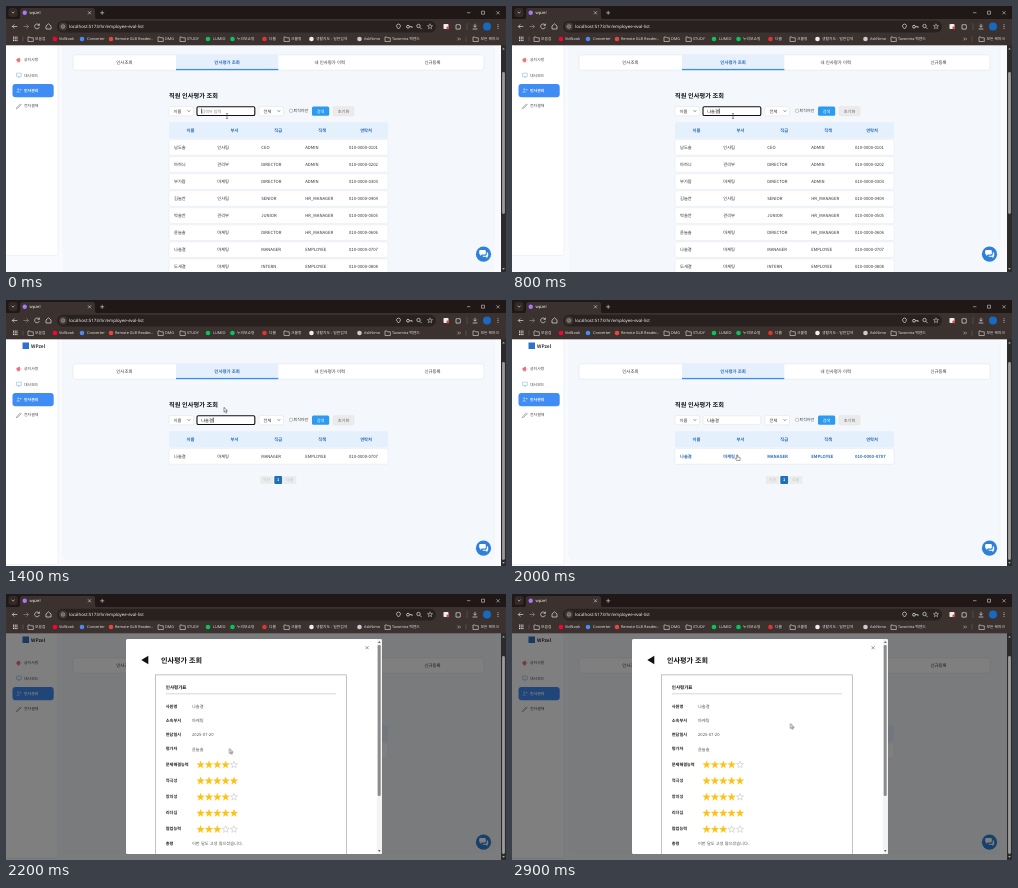
An HTML page for the animation above (3 s loop, 500x266 px).

```html
<!DOCTYPE html>
<html lang="ko">
<head>
<meta charset="utf-8">
<title>Employee evaluation</title>
<style>
html, body { margin: 0; width: 100%; height: 100%; overflow: hidden; background: #f6f8fc; }
svg { display: block; width: 100%; height: 100%; }
text { font-family: "Noto Sans CJK KR", "Noto Sans CJK", "Noto Sans", sans-serif; text-rendering: geometricPrecision; white-space: pre; }
.ui text { font-family: "Noto Sans", "Noto Sans CJK KR", "Noto Sans CJK", sans-serif; }
</style>
</head>
<body>
<script>
const LOOP = 3000;
let css = '', animCount = 0;

// Stepped animation: each stop is [ms, value] and holds until the next one.
function anim(prop, stops) {
  const name = 'a' + animCount++;
  const frames = stops.map(([t, v]) => `${Math.max(0, t - 4) / LOOP * 100}%{${prop}:${v}}`);
  css += `@keyframes ${name}{${frames.join('')}}`;
  return `style="animation:${name} ${LOOP}ms step-end infinite"`;
}
const move = stops => anim('transform', stops.map(([t, x, y]) => [t, `matrix(1,0,0,1,${x},${y})`]));
const during = (from, to, body) =>
  `<g ${anim('opacity', [...(from ? [[0, 0]] : []), [from, 1], ...(to < LOOP ? [[to, 0]] : [])])}>${body}</g>`;

const text = (x, y, size, str, fill = '#333', weight = 400, anchor = 'start') =>
  `<text x="${x}" y="${y + size * .36}" font-size="${size}" fill="${fill}" font-weight="${weight}" text-anchor="${anchor}">${str}</text>`;
const mid = (x, y, size, str, fill, weight) => text(x, y, size, str, fill, weight, 'middle');
const rect = (x, y, w, h, fill, r = 0, more = '') =>
  `<rect x="${x}" y="${y}" width="${w}" height="${h}" rx="${r}" fill="${fill}" ${more}/>`;
const dot = (x, y, r, fill) => `<circle cx="${x}" cy="${y}" r="${r}" fill="${fill}"/>`;
const line = (d, color = '#ddd', w = .7, fill = 'none') =>
  `<path d="${d}" stroke="${color}" stroke-width="${w}" fill="${fill}" stroke-linejoin="round"/>`;
const shape = (d, fill) => `<path d="${d}" fill="${fill}"/>`;
const border = (color, w = .5) => `stroke="${color}" stroke-width="${w}"`;

/* ---------- browser frame ---------- */
const folder = x => line(`M${x} 31h2l.7.8h2.6v3.7h-5.3z`, '#ddd', .6);
const bookmarks = [
  ['f', 22, 29, '모음집'], ['#f03', 49, 53, 'VidNook'], ['#4a8af4', 76, 81, 'Converter'],
  ['#e8463c', 105, 109, 'Remote GLB Reader...'], ['f', 152, 159, 'DMG'], ['f', 174, 181, 'STUDY'],
  ['#03c75a', 202, 207, 'LUMIO'], ['#03c75a', 226.5, 231, '누리보쇼핑'], ['#e5322d', 258.5, 263, '다룸'],
  ['f', 278, 285, '크롤링'], ['#eee', 305.5, 310, '생활지도 - 일반검색'], ['#ccc', 353.5, 358, 'AskNimo'],
  ['f', 379, 386, 'Tavomira 백엔드'], ['f', 467, 474.5, '모든 북마크']
].map(([kind, x, tx, label]) => (kind === 'f' ? folder(x) : dot(x, 33, 2.3, kind)) + text(tx, 33, 3.8, label, '#ddd')).join('');

const chrome = `<g class="ui">
  ${rect(0, 0, 500, 14, '#1f1816')}${rect(0, 13, 500, 26.3, '#3b322f')}
  ${rect(2.5, 2, 9, 9, '#332a27', 2.5)}${line('M5.7 5.8l1.4 1.4 1.4-1.4')}
  ${shape('M11 13.5q3 0 3-3V4.5q0-2.5 2.5-2.5h70q2.5 0 2.5 2.5v6q0 3 3 3z', '#3b322f')}
  ${dot(18.7, 6.8, 2.2, '#a779f6')}${text(23.5, 6.7, 4.1, 'wpzel', '#eee')}
  ${line('M82 5.3l3 3m0-3l-3 3M94.2 6.8h4m-2-2v4', '#ddd', .6)}
  ${line('M461 6.7h3.4M475.5 5.2h3v3h-3zM490.4 5.2l3.2 3.2m0-3.2l-3.2 3.2', '#eee', .5)}
  ${line('M11.3 20.5h-5m2-2l-2 2 2 2', '#ddd')}
  ${line('M17.5 20.5h5m-2-2l2 2-2 2', '#918884')}
  ${line('M33 19a2.4 2.4 0 1 0 .3 2.2M33.4 17.6v1.8h-1.8', '#ddd')}
  ${line('M40 23v-3l2.5-2.2L45 20v3z', '#ddd')}
  ${rect(51, 14.8, 379, 11.6, '#29211f', 5.8)}${dot(57, 20.5, 4, '#443b38')}
  <circle cx="57" cy="20.5" r="1.7" fill="none" ${border('#ddd')}/>${line('M57 19.8v1.6', '#ddd', .5)}
  ${text(63, 20.4, 4.4, 'localhost:5173/hr/employee-eval-list', '#eee')}
  ${line('M392.5 23q-4-4 0-5 4 1 0 5z', '#ddd')}
  <circle cx="402" cy="20.7" r="1.4" fill="none" ${border('#ddd', .8)}/>${line('M403.4 20.7h2.7v1.2', '#ddd', .8)}
  <circle cx="412.5" cy="20" r="1.7" fill="none" ${border('#ddd', .7)}/>${line('M413.8 21.3l1.8 1.8', '#ddd')}
  ${line(star(424, 20.5, 2.7), '#ddd', .5)}
  ${rect(437.5, 18, 5, 5, '#eee', .8)}${dot(441.8, 22, 1.4, '#e04437')}
  ${line('M450 18.8h1.5q.7-1.5 1.4 0h1.3v1.5q1.5.7 0 1.4v1.4H450z', '#ddd')}
  ${line('M461 17v7', '#6d625e', .5)}
  ${line('M469 17.8v3.4m-1.6-1.5l1.6 1.6 1.6-1.6M466.6 23h4.8', '#ddd')}
  ${dot(481, 20.5, 4, '#1769c2')}${[18.7, 20.5, 22.3].map(y => dot(492, y, .5, '#ddd')).join('')}
  ${[0, 1, 2].map(i => [0, 1, 2].map(j => rect(7 + i * 1.7, 30.6 + j * 1.7, 1.1, 1.1, '#ddd')).join('')).join('')}
  ${line('M17 30.5v5M460 30.5v5', '#746a66', .5)}${bookmarks}
  ${line('M451.5 31.7l1.3 1.3-1.3 1.3m1.8-2.6l1.3 1.3-1.3 1.3', '#ddd', .5)}
</g>`;

const scrollbar = rect(495, 39, 5, 227, '#2b2b2b') +
  shape('M496.2 43.6l1.3-1.8 1.3 1.8z', '#aaa') + shape('M496.2 262l1.3 1.8 1.3-1.8z', '#aaa') +
  during(0, 1400, rect(496.1, 66, 2.8, 142, '#9c9c9c', 1.4)) +
  during(1400, LOOP, rect(496.1, 62, 2.8, 198, '#9c9c9c', 1.4));

/* ---------- page ---------- */
const blue = '#2b6cb5';
const EMPLOYEE = '나솔결';
const columns = [168, 211.3, 255.2, 299.2, 343];
const staff = [
  ['남도솔', '인사팀', 'CEO', 'ADMIN', '0101'], ['마하늬', '관리부', 'DIRECTOR', 'ADMIN', '0202'],
  ['부가람', '마케팅', 'DIRECTOR', 'ADMIN', '0303'], ['김늘찬', '인사팀', 'SENIOR', 'HR_MANAGER', '0404'],
  ['박솔찬', '관리부', 'JUNIOR', 'HR_MANAGER', '0505'], ['윤늘솔', '마케팅', 'DIRECTOR', 'HR_MANAGER', '0606'],
  [EMPLOYEE, '마케팅', 'MANAGER', 'EMPLOYEE', '0707'], ['도새결', '마케팅', 'INTERN', 'EMPLOYEE', '0808']
];
function row(person, i, fill = '#333', weight = 400) {
  const y = 156.4 + i * 17.05;
  return rect(163, y - 7.8, 219, 15.6, '#fff', 1.5, border('#e6ebf2', .6)) +
    person.map((v, c) => text(columns[c], y, 4.25, c === 4 ? '010-0000-' + v : v, fill, weight)).join('');
}
const select = (x, label) => rect(x, 115.5, 24.5, 9.3, '#fff', 1.5, border('#dde1e6')) +
  text(x + 4.6, 120, 4.2, label) + line(`M${x + 18.7} 119.4l1.2 1.2 1.2-1.2`, '#222', .6);

const menu = [['공지사항', 69], ['대시보드', 84.2], ['인사관리', 99.5], ['전자결재', 114.8]]
  .map(([label, y], i) => text(18, y, 3.9, label, i === 2 ? '#fff' : '#444', i === 2 ? 700 : 500)).join('');
const menuIcons = shape('M10.5 68l3.4-1.6v5.2l-3.4-1.6z', '#e9707a') + line('M11.6 70.2l.5 1.7M14.8 68.2v1.6', '#e9707a', .6) +
  line('M10.5 82.2h4.8v3.2h-4.8zM12 86.4h2', '#8fbbe4', .6) +
  dot(12.2, 98.4, 1.1, '#8ec6ff') + shape('M10 101.6q2.2-3.4 4.4 0z', '#8ec6ff') + dot(14.7, 98.8, .8, '#b9dcff') +
  line('M10.8 116.6l3.6-3.7.8.8-3.6 3.6-1.2.3z', '#777', .6);

const sidebar = rect(-4, 30, 56, 234.5, '#fff', 2, border('#e7ebf1', .6)) +
  rect(16.5, 42.5, 6.5, 6.5, '#2f73c9') + text(25, 46.2, 4.8, 'WPzel', '#333', 700) +
  rect(6.5, 93, 41.2, 13.2, '#3f8cf4', 3) + menu + menuIcons;

const tabs = rect(67, 63.8, 411, 15.4, '#fff', 2.5, border('#e4e9f0', .7)) +
  rect(170, 63.8, 102.3, 15.4, '#e5f0fc') + rect(170, 77.9, 102.3, 1.3, '#3d8fe6') +
  ['인사조회', '인사평가 조회', '내 인사평가 이력', '신규등록']
    .map((s, i) => mid(118.4 + i * 102.7, 71.3, 4.4, s, i === 1 ? blue : '#333', i === 1 ? 700 : 500)).join('');

// Composition stages of the typed name, one per keystroke.
const stages = ['', 'ㄴ', '나', '낫', '나소', '나솔', '나솔ㄱ', EMPLOYEE];
const typed = stages.map((s, i) => {
  const to = i === stages.length - 1 ? LOOP : (i + 1) * 100;
  const caret = rect(195.2 + s.length * 3.9, 117.6, .6, 5, '#111');
  return during(i * 100, to, (s ? text(195.2, 120.2, 4.25, s, '#222') : text(195.2, 120.2, 4.1, '검색어 입력', '#888')) +
    during(0, 2000, caret));
}).join('');

const filters = select(163, '이름') + select(253, '전체') +
  rect(191, 115.8, 57.8, 8.7, '#fff', 1.3, border('#dde1e6')) +
  during(0, 2000, rect(191, 115.8, 57.8, 8.7, '#fff', 1.3, border('#111', 1.1))) + typed +
  rect(283.6, 118.3, 3, 3, '#fff', .5, border('#777', .4)) + text(287.5, 120, 4, '퇴직자만', '#444') +
  rect(306, 115.4, 17.2, 9.3, '#2b9bf0', 1.5) + mid(314.6, 120, 4.2, '검색', '#fff', 500) +
  rect(327, 115.4, 21, 9.3, '#ebebeb', 1.5, border('#dedede', .4)) + mid(337.5, 120, 4.2, '초기화', '#666');

const heading = rect(163, 131.2, 219, 16.2, '#e4f0fc', 1.5) +
  ['이름', '부서', '직급', '직책', '연락처'].map((s, i) => mid(184.5 + i * 43.9, 139.3, 4.3, s, blue, 700)).join('');

const pager = rect(254, 176, 13, 8, '#ececec', 1) + mid(260.5, 180, 3.7, '이전', '#bbb') +
  rect(268.3, 176, 7.8, 8, '#1f70b8', 1) + mid(272.2, 180, 3.9, '1', '#fff', 700) +
  rect(277.2, 176, 13, 8, '#ececec', 1) + mid(283.7, 180, 3.7, '다음', '#bbb');

const page = rect(0, 39, 495, 227, '#f8fafd') +
  `<g ${move([[0, 0, -15], [1400, 0, 0]])}>
    ${rect(57, 30, 431, 229, '#f4f7fc', 4, border('#eef2f8', .6))}
    ${sidebar}${tabs}${text(163, 105, 6.2, '직원 인사평가 조회', '#111', 700)}${filters}${heading}
    ${during(0, 1400, rect(57, 258, 431, 40, '#f4f7fc') + staff.map((p, i) => row(p, i)).join(''))}
    ${during(1400, LOOP, row(staff[6], 0) + pager)}
    ${during(1900, LOOP, row(staff[6], 0, blue, 700))}
  </g>` +
  dot(477.5, 248.2, 7.6, '#2f80d8') +
  shape('M473.2 245q0-1 1-1h4.6q1 0 1 1v2.6q0 1-1 1h-2.9l-1.6 1.5v-1.5q-1.1 0-1.1-1z', '#fff') +
  shape('M480.8 246.3q1.4 0 1.4 1.2v2.3q0 1-.9 1v1.4l-1.5-1.4h-2.4q-.9 0-.9-1h3.2q1.1-.3 1.1-1.5z', '#fff');

/* ---------- evaluation dialog ---------- */
function star(x, y, r) {
  return 'M' + Array.from({ length: 10 }, (_, i) => {
    const a = i * Math.PI / 5, q = i % 2 ? r * .42 : r;
    return `${(x + q * Math.sin(a)).toFixed(2)} ${(y - q * Math.cos(a)).toFixed(2)}`;
  }).join('L') + 'z';
}
const details = [['사원명', 112.3, EMPLOYEE], ['소속부서', 126.4, '마케팅'], ['면담일시', 140.6, '2025-07-20'],
  ['평가자', 155, '윤늘솔'], ['총평', 249.5, '이번 달도 고생 많으셨습니다.']]
  .map(([k, y, v]) => text(159.8, y, 4.15, k, '#222', 700) + text(186, y, 4.2, v, '#555')).join('');
const scores = [['문제해결능력', 4], ['적극성', 5], ['창의성', 4], ['리더십', 5], ['협업능력', 3]]
  .map(([k, n], i) => {
    const y = 170.3 + i * 16.15;
    return text(159.8, y, 4.15, k, '#222', 700) + [0, 1, 2, 3, 4].map(j => {
      const on = j < n;
      return line(star(194.6 + j * 8.35, y + .5, on ? 4.1 : 3.7), on ? '#fcc21b' : '#bbb', on ? .2 : .5, on ? '#fcc21b' : '#fff');
    }).join('');
  }).join('');

const dialog = `<g ${anim('opacity', [[0, 0], [2100, .36], [2200, .5]])}>${rect(0, 39, 495, 227, '#000')}</g>
  <g ${anim('opacity', [[0, 0], [2100, .65], [2200, 1]])}>
    ${rect(120, 45, 256, 215, '#fff', 1.5)}
    <g clip-path="url(#dialog)">
      ${rect(149.6, 80.9, 191, 190, '#fff', 0, border('#999', .6))}
      ${shape('M135.3 66l7-4.2v8.4z', '#111')}${text(155, 66, 7.1, '인사평가 조회', '#111', 700)}
      ${line('M359.6 52.2l3 3m0-3l-3 3', '#555', .6)}
      ${text(159.8, 93, 4.5, '인사평가표', '#111', 700)}${line('M159.8 99.8H330', '#bbb', .6)}
      ${details}${scores}
      ${rect(370.8, 45, 5.2, 215, '#f3f3f3')}${rect(371.7, 51, 3, 151, '#8b8b8b', 1.2)}
      ${shape('M371.9 49l1.4-2 1.4 2z', '#666')}${shape('M371.9 256l1.4 2 1.4-2z', '#666')}
    </g>
  </g>`;

/* ---------- pointer ---------- */
const path = [[0, 221, 110], [1400, 218, 107.3], [1700, 219, 113], [1800, 221, 130], [1900, 224, 150], [2000, 225.2, 155], [2100, 223.5, 154.6]];
for (let i = 1; i <= 7; i++) {
  const k = 1 - (1 - i / 7) ** 1.5;
  path.push([2200 + i * 100, 223.5 + 55 * k, 154.6 - 25 * k]);
}
const arrow = line('M0 0v4.8l1.1-1 .8 1.8.9-.4-.8-1.7h1.5z', '#111', .45, '#fff');
const beam = line('M-1.1-2.5h.8l.3.3.3-.3h.8M0-2.2v4.4M-1.1 2.5h.8l.3-.3.3.3h.8', '#222', .5);
const hand = line('M-.6 0q.6-.6 1.1 0v2l2.1.5q.6.2.5.9l-.5 2.3H-.4l-1.5-2.2q-.1-.8 1.3.1z', '#111', .45, '#fff');
const pointer = `<g ${move(path)}>
  ${during(0, 1400, beam)}${during(1400, 1900, arrow)}${during(1900, 2100, hand)}${during(2100, LOOP, arrow)}</g>`;

const scene = page + dialog + scrollbar + chrome + pointer;
document.body.innerHTML = `<style>${css}</style>
  <svg viewBox="0 0 500 266" preserveAspectRatio="none">
    <defs><clipPath id="dialog">${rect(120, 45, 256, 215, '#000', 1.5)}</clipPath></defs>${scene}
  </svg>`;
</script>
</body>
</html>
```
